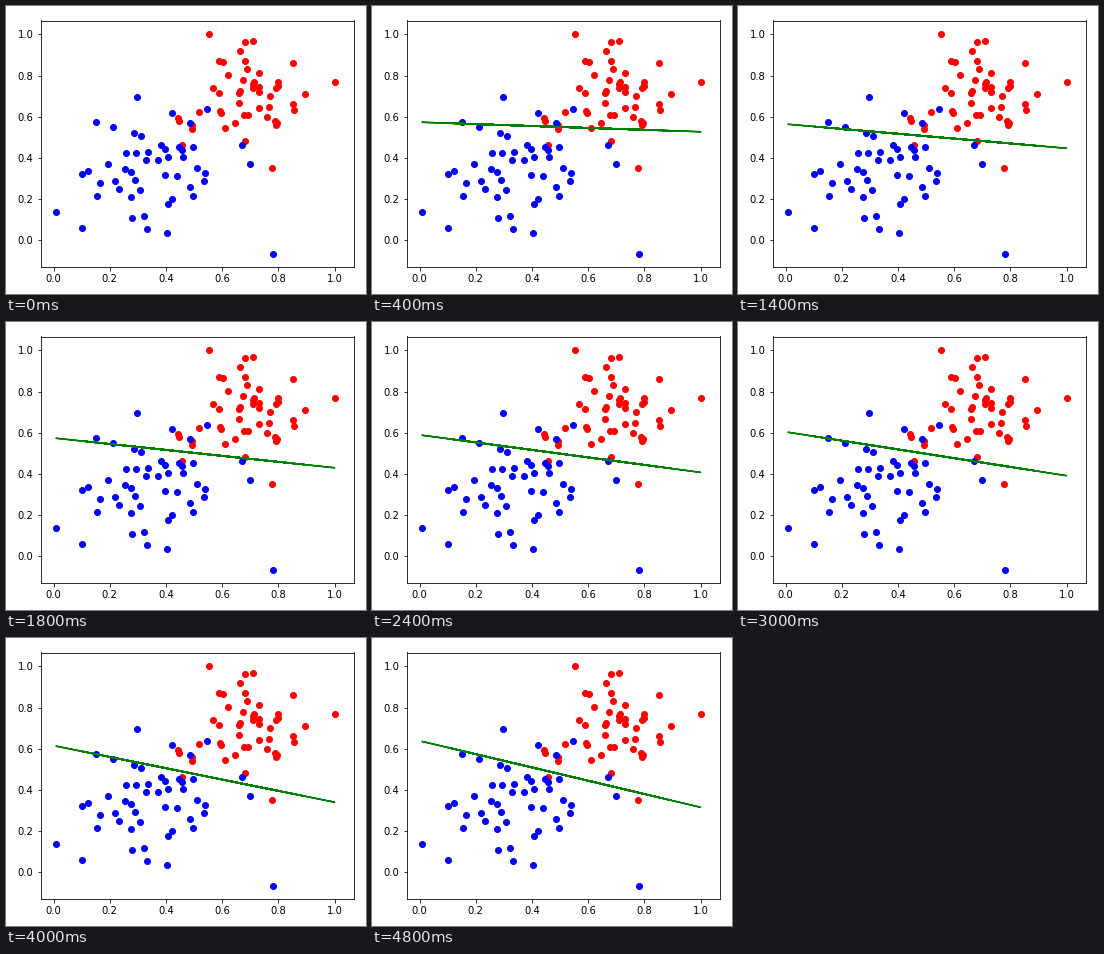
These frames come from a looping animation (360x288 px, 5 s). A matplotlib script:

```python
import numpy as np
import matplotlib.pyplot as plt
from matplotlib.animation import FuncAnimation

WIDTH, HEIGHT, DPI = 360, 288, 72
FRAMES, INTERVAL = 25, 200

# Axes edges in pixels, and the pixel place of the data origin and unit.
LEFT, RIGHT, TOP, BOTTOM = 34.5, 347.5, 14.5, 260.5
X_ZERO, X_UNIT = 47.6, 281
Y_ZERO, Y_UNIT = 234.4, 206

LOWER_CLASS = np.array([
    (.781, -.064), (.288, .291), (.407, .179), (.292, .422), (.509, .353),
    (.278, .108), (.275, .332), (.440, .312), (.336, .430), (.234, .250),
    (.0084, .137), (.124, .336), (.256, .426), (.459, .404), (.445, .451),
    (.422, .201), (.496, .214), (.308, .243), (.397, .444), (.329, .392),
    (.407, .403), (.311, .507), (.496, .454), (.101, .321), (.699, .373),
    (.298, .696), (.151, .573), (.164, .278), (.333, .056), (.537, .286),
    (.195, .369), (.403, .035), (.213, .552), (.484, .570), (.255, .346),
    (.217, .286), (.671, .465), (.382, .462), (.538, .328), (.485, .261),
    (.371, .388), (.545, .639), (.321, .120), (.422, .617), (.102, .060),
    (.153, .217), (.456, .438), (.285, .521), (.276, .213), (.397, .319),
])
UPPER_CLASS = np.array([
    (.553, 1.0), (.443, .592), (.852, .661), (.604, .866), (.682, .483),
    (1.0, .768), (.730, .811), (.674, .780), (.788, .582), (.714, .767),
    (.494, .542), (.790, .742), (.679, .609), (.664, .725), (.794, .568),
    (.708, .760), (.594, .619), (.494, .562), (.777, .350), (.798, .769),
    (.709, .968), (.692, .609), (.664, .921), (.660, .667), (.646, .568),
    (.896, .709), (.855, .632), (.621, .804), (.791, .561), (.589, .716),
    (.568, .741), (.659, .715), (.709, .740), (.592, .629), (.458, .464),
    (.800, .748), (.610, .548), (.681, .870), (.767, .647), (.690, .831),
    (.681, .965), (.732, .642), (.761, .601), (.590, .870), (.731, .745),
    (.770, .701), (.732, .718), (.446, .580), (.853, .860), (.519, .624),
])

# Height of the boundary at its two ends after selected epochs.
EPOCHS = [1, 2, 3, 11, 16, 17, 24]
LEFT_END = [.9352, .5735, .5442, .5833, .6075, .5959, .6359]
RIGHT_END = [1.0590, .5274, .4812, .4131, .3864, .3595, .3160]

fig = plt.figure(figsize=(WIDTH / DPI, HEIGHT / DPI), dpi=DPI)
ax = fig.add_axes([LEFT / WIDTH, 1 - BOTTOM / HEIGHT,
                   (RIGHT - LEFT) / WIDTH, (BOTTOM - TOP) / HEIGHT])
ax.scatter(*UPPER_CLASS.T, color="red")
ax.scatter(*LOWER_CLASS.T, color="blue")
ax.set_xlim((LEFT - X_ZERO) / X_UNIT, (RIGHT - X_ZERO) / X_UNIT)
ax.set_ylim((Y_ZERO - BOTTOM) / Y_UNIT, (Y_ZERO - TOP) / Y_UNIT)
ax.set_xticks(np.arange(6) / 5)
ax.set_yticks(np.arange(6) / 5)

# The boundary visits the samples unsorted, so its strokes overlap.
sample_x = np.concatenate([LOWER_CLASS[:, 0], UPPER_CLASS[:, 0]])
x_range = [sample_x.min(), sample_x.max()]
boundary, = ax.plot([], [], color="green")


def update(epoch):
    if epoch == 0:
        boundary.set_data([], [])
    else:
        ends = [np.interp(epoch, EPOCHS, end) for end in (LEFT_END, RIGHT_END)]
        boundary.set_data(sample_x, np.interp(sample_x, x_range, ends))
    return boundary,


anim = FuncAnimation(fig, update, frames=FRAMES, interval=INTERVAL,
                     repeat=True, repeat_delay=0)
plt.show()
```
